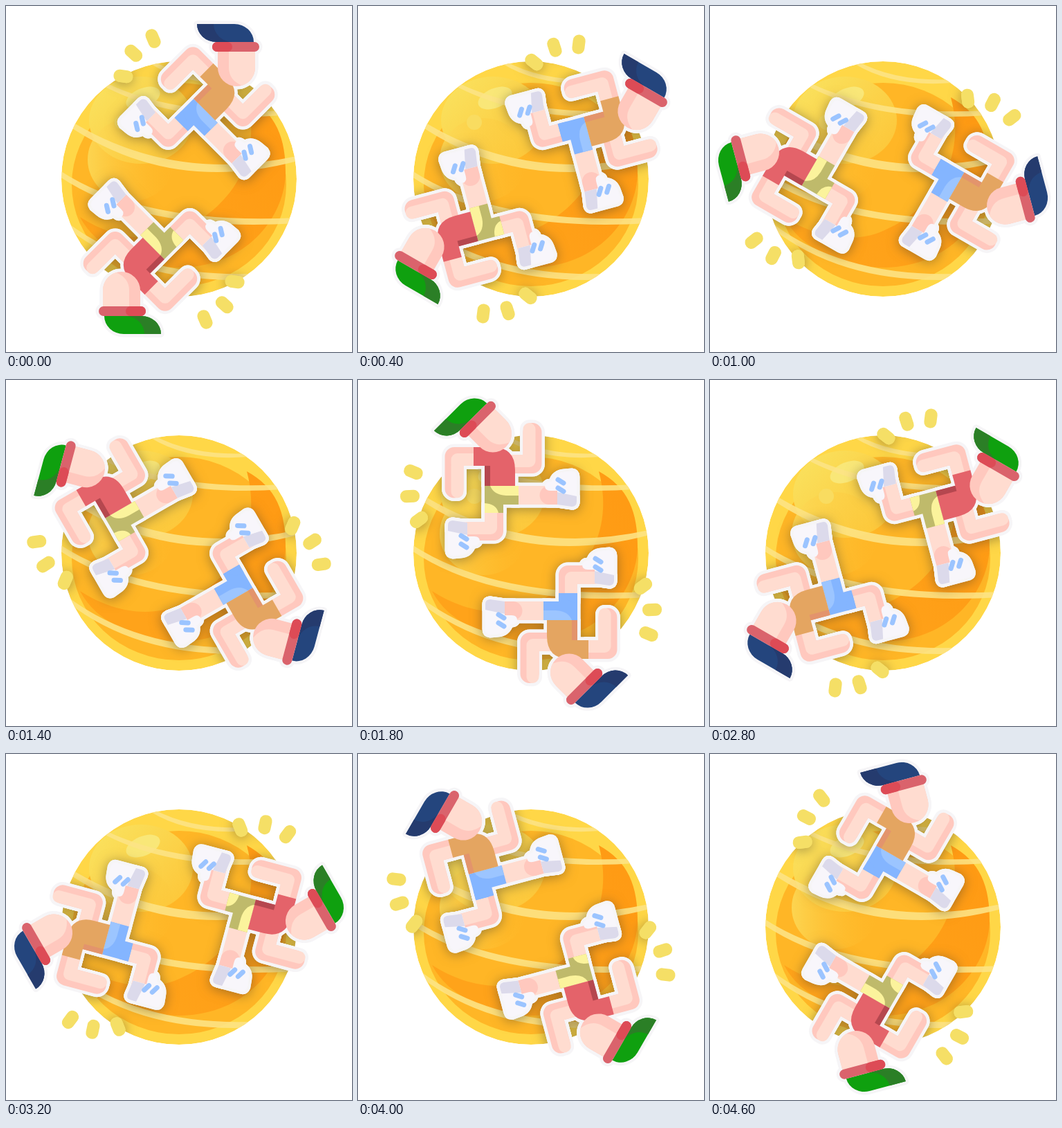
An HTML page with a canvas that plays this animation: 500x500 px, repeating every 4800 ms.

```html
<!DOCTYPE html>
<html lang="en">
<head>
<meta charset="utf-8">
<title>Runners around a ball</title>
<style>
html, body { margin: 0; width: 100%; height: 100%; overflow: hidden; background: #fff; }
canvas { display: block; }
</style>
</head>
<body>
<canvas id="stage" width="500" height="500"></canvas>
<script>
const ctx = stage.getContext('2d');
const layer = new OffscreenCanvas(500, 500);
const pen = layer.getContext('2d');
const STEP = 200, STEPS = 24;
const RIM = 4.5, RIM_COLOR = '#f6f5f7';
const SKIN = '#ffdcd0', BLUSH = '#ffc8be', SHOE = '#f8f6fb', SOLE = '#dcdaeb', STRIPE = '#9bc4ff';

const turn = (deg, x, y) => new DOMMatrix().translate(x, y).rotate(deg).translate(-x, -y);
const tilted = turn(-45, 250, 250);
const flipped = turn(180, 223, 193);

// A part with a width is a round stroke, otherwise a filled shape.
function part(d, color, width = 0, matrix = new DOMMatrix()) {
  const path = new Path2D();
  path.addPath(new Path2D(d), matrix);
  return { path, color, width };
}

function shoe(matrix) {
  return [
    part('M316 140V176Q316 183 309 183L288 180V160H278Q270 160 270 153Q271 147 280 147Q284 134 298 133L309 132Q316 133 316 140Z', SHOE, 0, matrix),
    part('M288 162L316 168V176Q316 183 309 183L288 180Z', SOLE, 0, matrix),
    part('M278 153H284', SHOE, 12, matrix),
    part('M289 144L297 149M289 156L297 161', STRIPE, 7, matrix)
  ];
}

function runner(c) {
  const head = (d, color, width) => part(d, color, width, tilted);
  return [
    // arms
    part('M139 157V110.5H170', BLUSH, 27),
    part('M143.5 161.5V115H170', SKIN, 18),
    part('M252 75.5V121.5H212', BLUSH, 27),
    part('M247.5 71V117H212', SKIN, 18),
    // legs
    part('M196.5 185V218.5H150', BLUSH, 27),
    part('M192 185V214H150', SKIN, 18),
    part('M225 166.5H298', SKIN, 27),
    part('M276 166.5H298', BLUSH, 27),
    ...shoe(), ...shoe(flipped),
    // shorts and shirt
    part('M183 153H232V180H210V192H183Z', c.shortsDark),
    part('M183 178Q200 179 203 192H183Z', c.shortsBack),
    part('M191 153H232V167H214Q196 166 191 153Z', c.shorts),
    part('M167 97H194Q227 97 227 130V153H183V124H167Z', c.shirt),
    part('M183 124H191V153H183Z', c.shirtDark),
    // head
    head('M306 60H360V89A27 27 0 0 1 306 89Z', BLUSH),
    head('M322 60H360V89A27 27 0 0 1 341 115Q322 107 322 89Z', SKIN),
    head('M276 26H330A28 26 0 0 1 358 52H304A28 26 0 0 1 276 26Z', c.cap),
    head('M276 26H300A28 26 0 0 0 328 52H304A28 26 0 0 1 276 26Z', c.capDark),
    head('M305 59H359', '#da636c', 14),
    head('M305 59H320', '#dd4b56', 14)
  ];
}

const blue = runner({
  shirt: '#e4a561', shirtDark: '#e3946c', shorts: '#9cc5ff', shortsDark: '#84b5ff',
  shortsBack: '#84b5ff', cap: '#24457d', capDark: '#253b6e'
});
const green = runner({
  shirt: '#e4636a', shirtDark: '#b5474f', shorts: '#fbf39c', shortsDark: '#bfba6b',
  shortsBack: '#fbf39c', cap: '#0fa00f', capDark: '#2b7f26'
});
const dashes = [[80, 133, 22], [75, 168, -3], [88, 202, -37]];

function drawPart({ path, color, width }, rim) {
  pen.fillStyle = pen.strokeStyle = rim ? RIM_COLOR : color;
  pen.lineWidth = width + (rim ? RIM * 2 : 0);
  if (width || rim) pen.stroke(path);
  if (!width) pen.fill(path);
}

function drawTeam(parts, deg) {
  const base = turn(deg, 250, 250);
  pen.setTransform(base);
  pen.lineCap = pen.lineJoin = 'round';
  parts.forEach(p => drawPart(p, true));
  parts.forEach(p => drawPart(p, false));
  pen.fillStyle = '#f5df66';
  for (const [x, y, tilt] of dashes) {
    pen.setTransform(base.translate(x, y).rotate(tilt));
    pen.beginPath();
    pen.roundRect(-14, -9, 28, 18, 8.5);
    pen.fill();
  }
}

function ellipse(x, y, rx, ry, fill, tilt = 0) {
  ctx.fillStyle = fill;
  ctx.beginPath();
  ctx.ellipse(x, y, rx, ry, tilt, 0, 7);
  ctx.fill();
}

function fade(x0, y0, x1, y1, from, to) {
  const g = ctx.createLinearGradient(x0, y0, x1, y1);
  g.addColorStop(0, from);
  g.addColorStop(1, to);
  return g;
}

// Bands are thicker in the middle than at their ends.
const bands = [
  'M208 77Q265 110 350 106V111Q265 118 208 83Z',
  'M136 107Q240 160 400 151V158Q240 170 136 113Z',
  'M90 164Q240 258 425 216V223Q240 274 90 173Z',
  'M75 236Q196 317 420 306V314Q196 328 75 245Z',
  'M90 314Q205 400 390 385V393Q205 411 90 322Z'
];

function drawBall() {
  ellipse(250, 250, 170, 170, '#ffd747');
  ellipse(250, 258, 155, 147, '#ffb626');
  ctx.fillStyle = fade(200, 350, 400, 200, '#ffa31a', '#ff9b14');
  ctx.fill(new Path2D('M348 132C390 155 405 190 404 245C400 310 345 375 255 378C190 378 130 350 107 305C150 333 205 345 250 325C310 300 375 235 348 132Z'));
  ellipse(195, 165, 75, 63, fade(145, 110, 260, 220, '#fae05c', '#fdc638'));
  ellipse(181, 222, 63, 60, fade(118, 222, 244, 222, 'rgba(252,218,88,.85)', 'rgba(254,190,44,0)'));
  ellipse(198, 133, 26, 14, '#f9e778', -0.4);
  ellipse(168, 168, 11, 11, '#f9dc60');
  ctx.fillStyle = 'rgba(253,228,134,.88)';
  bands.forEach(d => ctx.fill(new Path2D(d)));
}

function draw(step) {
  const deg = step * 360 / STEPS;
  pen.resetTransform();
  pen.clearRect(0, 0, 500, 500);
  drawTeam(blue, deg + 45);
  drawTeam(green, deg + 225);

  ctx.clearRect(0, 0, 500, 500);
  ctx.save();
  ctx.beginPath();
  ctx.arc(250, 250, 170, 0, 7);
  ctx.clip();
  drawBall();
  // shadows fall on the ball only
  ctx.shadowColor = 'rgba(70,60,40,.5)';
  ctx.shadowBlur = 17;
  ctx.shadowOffsetY = 2;
  ctx.drawImage(layer, 0, 0);
  ctx.restore();
  ctx.drawImage(layer, 0, 0);
}

const start = performance.now();
let shown = -1;
function tick() {
  const step = Math.floor((performance.now() - start) / STEP) % STEPS;
  if (step !== shown) draw(shown = step);
  requestAnimationFrame(tick);
}
tick();
</script>
</body>
</html>
```
